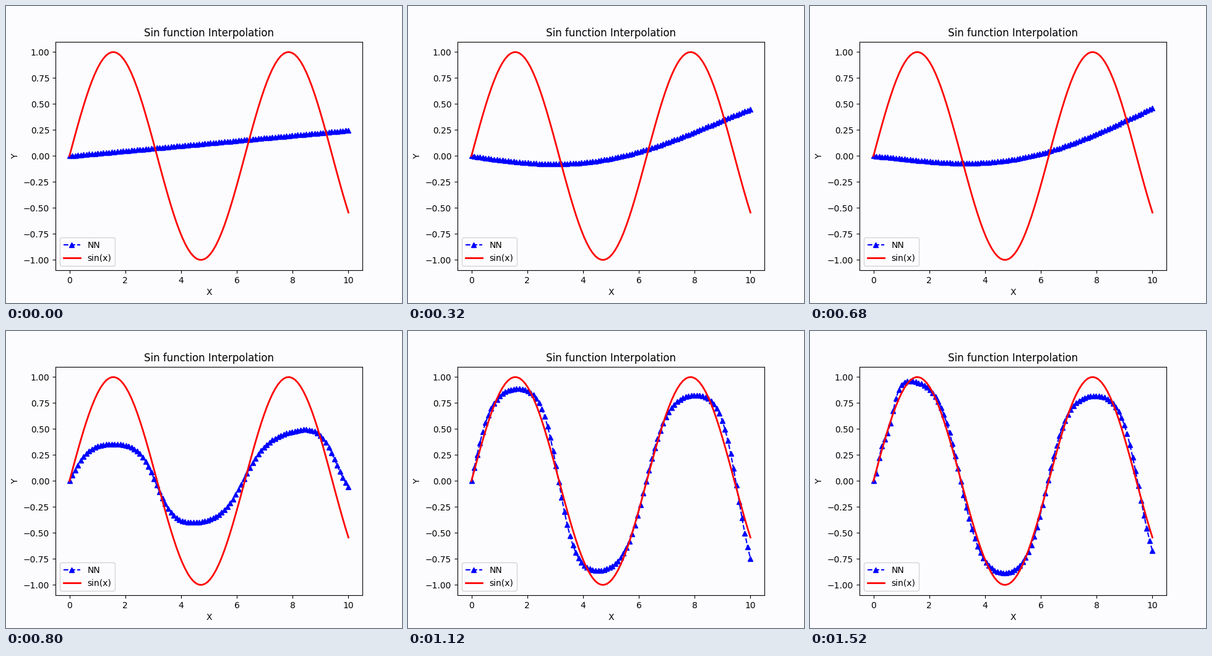
A matplotlib script for the animation above (1560 ms loop, 640 by 480 pixels).

```python
import numpy as np
import matplotlib.pyplot as plt
from matplotlib.animation import FuncAnimation

FRAMES, STEP_MS = 39, 40
PAPER = "#fcfcfe"

x = np.linspace(0, 10, 100)


def bend(*values):
    """Smooth polynomial through evenly spaced key points."""
    keys = np.linspace(0, 10, len(values))
    return np.polyval(np.polyfit(keys, values, len(values) - 1), x)


def network(*neurons):
    """Sum of tanh steps (height, steepness, centre), zero at x = 0."""
    return sum(h * (np.tanh(k * (x - c)) + np.tanh(k * c))
               for h, k, c in neurons)


line_fit = .0247 * x
dip = bend(0, -.073, -.024, .178, .45)
deep_dip = bend(0, -.093, -.042, .184, .475)
soft_dip = bend(0, -.062, -.034, .158, .46)
wave = network((.92, 1.4, 0), (-.91, 1.65, 3.12),
               (.88, 1.27, 6.25), (-1, 1.6, 9.56))
sharp_wave = network((.19, 8, .17), (.315, 4, .7), (-.965, 1.3, 3.11),
                     (.9, 1.33, 6.22), (-.95, 1.5, 9.53))

stages = [(0, line_fit), (8, dip), (12, deep_dip), (17, soft_dip),
          (24, wave), (33, wave), (38, sharp_wave)]


def fit_at(frame):
    for (a, start), (b, end) in zip(stages, stages[1:]):
        if frame <= b:
            return start + (end - start) * (frame - a) / (b - a)
    return stages[-1][1]


plt.rcParams["font.family"] = "DejaVu Sans"
fig, ax = plt.subplots(figsize=(6.4, 4.8), dpi=100, facecolor=PAPER)
ax.set_facecolor(PAPER)
net, = ax.plot(x, line_fit, "b--^", label="NN")
ax.plot(x, np.sin(x), "r-", lw=2, label="sin(x)")
ax.set(title="Sin function Interpolation", xlabel="X", ylabel="Y",
       xlim=(-.5, 10.5), ylim=(-1.1, 1.1))
ax.legend(loc="lower left", facecolor=PAPER)


def draw(frame):
    net.set_ydata(fit_at(frame))
    return net,


anim = FuncAnimation(fig, draw, frames=FRAMES, interval=STEP_MS,
                     repeat=True, repeat_delay=0)
plt.show()
```
